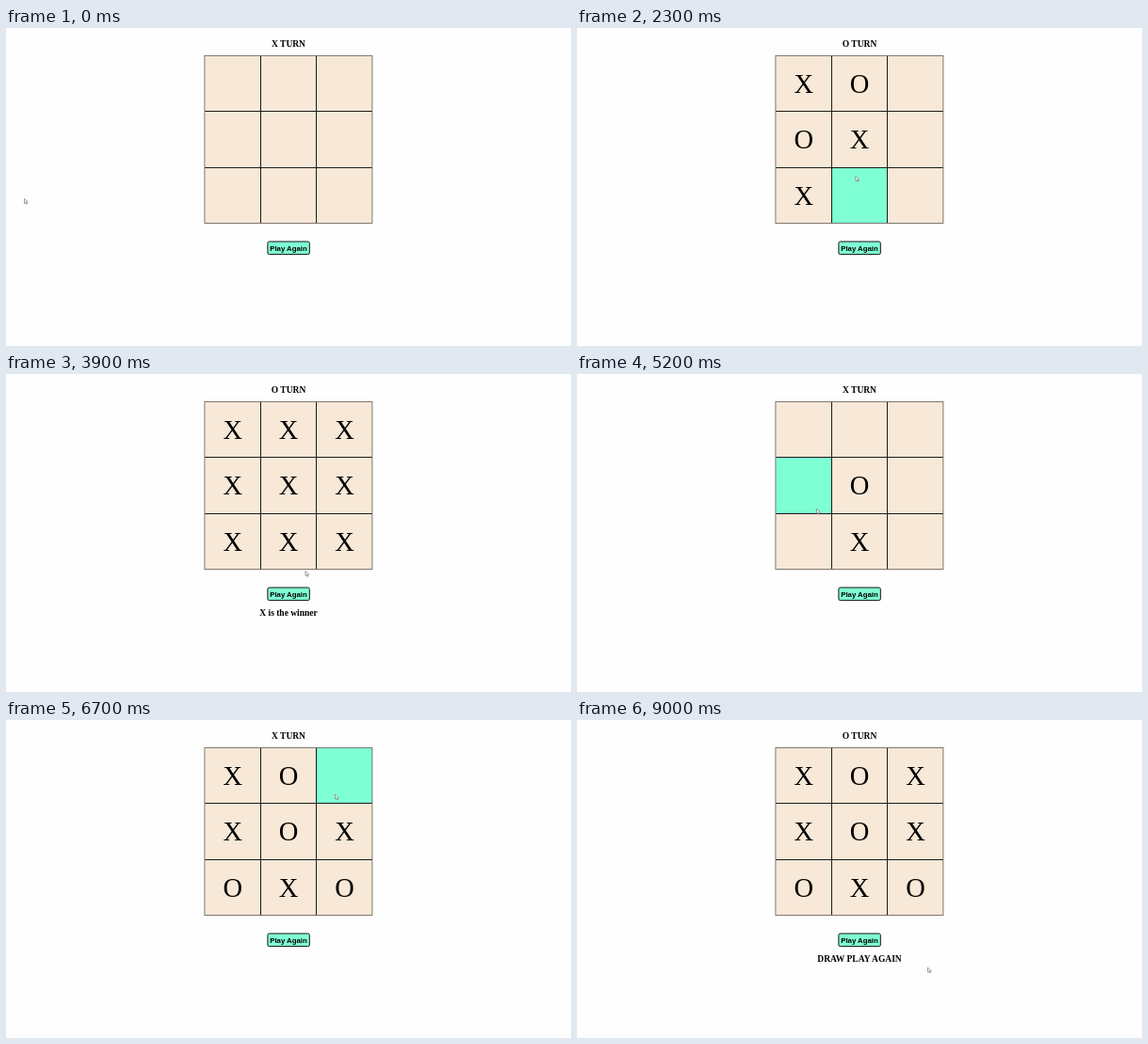
Animation, 600 px wide and 338 px high, one loop 9.1 s. Source, as an HTML page:

```html
<!DOCTYPE html>
<html lang="en">
<head>
<meta charset="utf-8">
<title>Tic tac toe</title>
<style>
  html, body { margin: 0; width: 100%; height: 100%; overflow: hidden; background: #fefefe; }
  svg { display: block; width: 100%; height: 100%; }
  text { text-anchor: middle; fill: #000; }
  .label { font: bold 9.5px "Liberation Serif", serif; }
  .mark { font: 28.5px "Liberation Serif", serif; }
  .button { font: bold 7.8px "Liberation Sans", sans-serif; }
</style>
</head>
<body>
<svg viewBox="0 0 600 338">
  <text id="turn" class="label" x="300" y="19.6"></text>
  <g id="cells"></g>
  <path d="M270.5 29.5V208M329.5 29.5V208M211 88.5H389M211 148.5H389" fill="none" stroke="#1c1a18"/>
  <rect x="210.9" y="29.5" width="178" height="178" fill="none" stroke="#736c65" stroke-width=".9"/>
  <rect id="again" x="277.9" y="227" width="44.4" height="13.6" rx="1.6" stroke="#111"/>
  <text class="button" x="300" y="236.7">Play Again</text>
  <text id="message" class="label" x="300" y="257.4"></text>
  <path id="cursor" d="M0 0V5L1.2 4L2.1 5.9L3 5.5L2.2 3.7H3.7Z" fill="#fff" stroke="#555" stroke-width=".55"/>
</svg>
<script>
const LOOP = 9100, STEP = 100;
const LEFT = 211, TOP = 29.5, SIZE = 59.4;
const CREAM = '#f7e8d7', AQUA = '#7fffd4';

// Each round: start time and moves as [time, cell]; X always opens
const rounds = [
  { start: 0, winner: 'X', moves: [[1100, 0], [1200, 1], [1600, 4], [1800, 3], [2100, 6], [2500, 7], [3400, 8]] },
  { start: 4500, moves: [[4700, 7], [5000, 4], [5300, 3], [5500, 1], [5700, 0], [5900, 6], [6100, 5], [6300, 8], [6800, 2]] }
];

// Cursor stops between moves: time, x, y
const stops = [
  [0, 19.5, 181.5], [300, 180, 231], [500, 300, 180], [600, 355, 150], [800, 340, 60],
  [1300, 298, 57], [1400, 340, 84], [1500, 290, 118], [2300, 296, 157.5], [3000, 350, 100],
  [3900, 318, 209.5], [4500, 303, 232], [4800, 342, 145], [5200, 254.5, 143.5],
  [6700, 349.5, 79], [7300, 330, 249], [7500, 350, 150], [7700, 300, 14], [7900, 240, 100],
  [8300, 240, 60], [8500, 350, 190], [8600, 312, 238], [8900, 312, 238], [9000, 372.5, 263]
];

const corner = i => [LEFT + i % 3 * SIZE, TOP + Math.floor(i / 3) * SIZE];
const clicks = rounds.flatMap(r => r.moves).map(([time, cell]) =>
  [time, ...corner(cell).map(v => v + SIZE / 2 - 2)]);
const path = [...stops, ...clicks].sort((a, b) => a[0] - b[0]);

const byId = id => document.getElementById(id);
const turn = byId('turn'), message = byId('message'), again = byId('again'), cursor = byId('cursor');

function add(name, attrs) {
  const node = document.createElementNS('http://www.w3.org/2000/svg', name);
  for (const key in attrs) node.setAttribute(key, attrs[key]);
  return byId('cells').appendChild(node);
}

const cells = Array.from({ length: 9 }, (_, i) => {
  const [x, y] = corner(i);
  return {
    box: add('rect', { x, y, width: SIZE, height: SIZE }),
    mark: add('text', { class: 'mark', x: x + SIZE / 2, y: y + SIZE / 2 + 9.5 })
  };
});

function cursorAt(t) {
  const i = path.findIndex(p => p[0] > t);
  if (i < 0) return path[path.length - 1].slice(1);
  const [t0, x0, y0] = path[i - 1], [t1, x1, y1] = path[i];
  const k = (t - t0) / (t1 - t0);
  return [x0 + (x1 - x0) * k, y0 + (y1 - y0) * k];
}

function draw(t) {
  const round = rounds.filter(r => r.start <= t).pop();
  const played = round.moves.filter(m => m[0] <= t);
  const over = played.length === round.moves.length;
  const marks = Array(9).fill('');
  played.forEach(([, cell], i) => marks[cell] = 'XO'[i % 2]);
  if (over && round.winner) marks.fill(round.winner);

  const [x, y] = cursorAt(t);
  const col = Math.floor((x - LEFT) / SIZE), row = Math.floor((y - TOP) / SIZE);
  cells.forEach(({ box, mark }, i) => {
    box.setAttribute('fill', i % 3 === col && Math.floor(i / 3) === row ? AQUA : CREAM);
    mark.textContent = marks[i];
  });
  const onButton = x > 278 && x < 323 && y > 226 && y < 241;
  again.setAttribute('fill', onButton ? CREAM : AQUA);
  turn.textContent = 'XO'[played.length % 2] + ' TURN';
  message.textContent = !over ? '' : round.winner ? round.winner + ' is the winner' : 'DRAW PLAY AGAIN';
  cursor.setAttribute('transform', `translate(${x} ${y})`);
}

const begin = performance.now();
function tick() {
  const t = (performance.now() - begin) % LOOP;
  draw(Math.floor(t / STEP) * STEP);
  requestAnimationFrame(tick);
}
tick();
</script>
</body>
</html>
```
